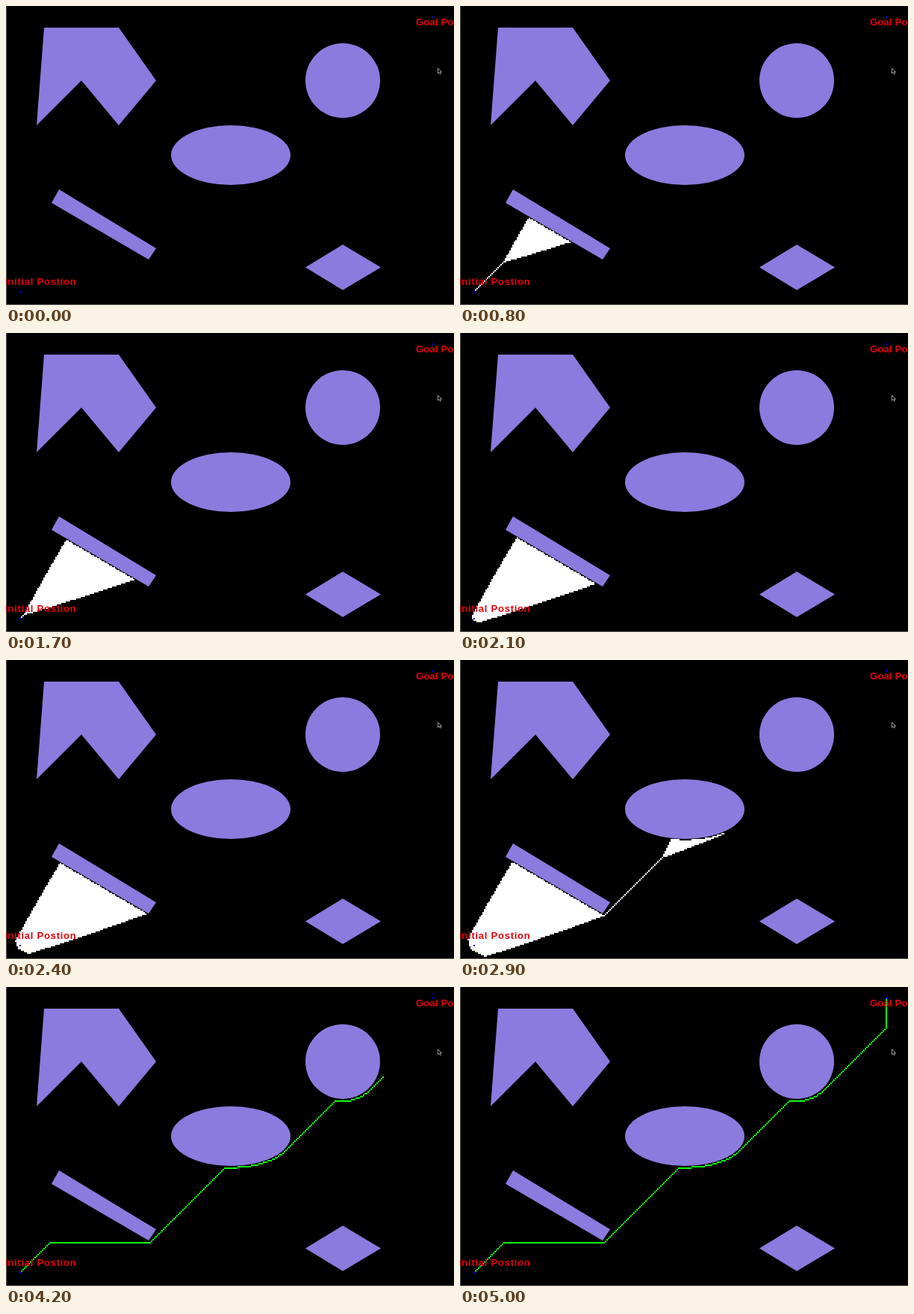
Write an HTML page with a canvas that moves like this. It is 600 px wide and 401 px high and loops after 5100 ms.

```html
<!DOCTYPE html>
<html lang="en">
<head>
<meta charset="utf-8">
<title>Path search</title>
<style>
html, body { margin: 0; width: 100%; height: 100%; overflow: hidden; background: #000; }
canvas { display: block; }
</style>
</head>
<body>
<canvas id="stage" width="600" height="401"></canvas>
<script>
const ctx = document.getElementById('stage').getContext('2d');
const LOOP = 5100, TICK = 100, SEARCH_START = 400, PATH_START = 3200;
const COLS = 300, ROWS = 200, CELL = 2;
const START = { x: 9, y: 191 }, GOAL = { x: 285, y: 7 };

const BAR = [[61, 264], [71, 246], [201, 325], [191, 340]];
const ARROW = [[51, 29], [151, 29], [201, 100], [151, 160], [101, 100], [41, 160]];
const DIAMOND = [[451, 320], [502, 350.5], [451, 381], [401, 350.5]];

// Obstacles on the search route, with a slight margin
function blocked(cx, cy) {
  const x = cx * CELL, y = cy * CELL;
  if (((x - 301) / 80) ** 2 + ((y - 200) / 40) ** 2 < 1.008) return true;
  if ((x - 451) ** 2 + (y - 100) ** 2 < 2585) return true;
  return BAR.every(([ax, ay], i) => {
    const [bx, by] = BAR[(i + 1) % BAR.length];
    const dx = bx - ax, dy = by - ay;
    return ((x - ax) * dy - (y - ay) * dx) / Math.hypot(dx, dy) <= 1;
  });
}

// A* on an 8-connected grid: every move costs 1, straight-line heuristic
function search() {
  const nodes = new Map(), open = [], visited = [];
  const addNode = (x, y, g, parent) => {
    const node = { x, y, g, parent, h: Math.hypot(GOAL.x - x, GOAL.y - y), closed: false };
    nodes.set(y * COLS + x, node);
    open.push(node);
  };
  addNode(START.x, START.y, 0, null);
  while (open.length) {
    let best = 0;
    for (let i = 1; i < open.length; i++) {
      if (open[i].g + open[i].h < open[best].g + open[best].h) best = i;
    }
    const cur = open[best];
    open[best] = open[open.length - 1];
    open.pop();
    cur.closed = true;
    visited.push(cur);
    if (cur.x === GOAL.x && cur.y === GOAL.y) break;
    for (let dy = -1; dy <= 1; dy++) for (let dx = -1; dx <= 1; dx++) {
      const x = cur.x + dx, y = cur.y + dy, g = cur.g + 1;
      if (x < 0 || y < 0 || x >= COLS || y >= ROWS || blocked(x, y)) continue;
      const node = nodes.get(y * COLS + x);
      if (!node) addNode(x, y, g, cur);
      else if (!node.closed && g <= node.g) { node.g = g; node.parent = cur; }
    }
  }
  const path = [];
  for (let n = visited[visited.length - 1]; n; n = n.parent) path.unshift(n);
  return { visited, path };
}

const { visited, path } = search();

// Number of visited cells once the front has reached pixel column x
const reach = x => visited.findIndex(n => n.x * CELL >= x) + 1;
const searchKeys = [[300, 0], [800, reach(145)], [1700, reach(169)],
  [2400, reach(185)], [2700, reach(285)], [3100, reach(520)]];
const pathKeys = [[3100, 0], [3200, 12], [3900, 188], [4200, 244], [4500, path.length]];

function lerpKeys(keys, t) {
  for (let i = 1; i < keys.length; i++) {
    const [t0, a] = keys[i - 1], [t1, b] = keys[i];
    if (t <= t1) return Math.round(a + (b - a) * (t - t0) / (t1 - t0));
  }
  return keys[keys.length - 1][1];
}

function polygon(points, fill) {
  ctx.beginPath();
  points.forEach(p => ctx.lineTo(p[0], p[1]));
  ctx.closePath();
  ctx.fillStyle = fill;
  ctx.fill();
}

function ellipse(x, y, rx, ry) {
  ctx.beginPath();
  ctx.ellipse(x, y, rx, ry, 0, 0, Math.PI * 2);
  ctx.fill();
}

function cells(list, count, color) {
  ctx.fillStyle = color;
  for (let i = 0; i < Math.min(count, list.length); i++) {
    ctx.fillRect(list[i].x * CELL, list[i].y * CELL, CELL, CELL);
  }
}

function label(text, x, y, spacing) {
  ctx.font = 'bold 13px "Liberation Sans", Arial, sans-serif';
  ctx.letterSpacing = spacing + 'px';
  ctx.fillStyle = '#e6000c';
  ctx.fillText(text, x, y);
}

function cursor() {
  ctx.beginPath();
  [[578.5, 83.5], [578.5, 90.5], [580, 89], [581.5, 91.5], [582.5, 91], [581.5, 88.5], [583.5, 88.5]]
    .forEach(p => ctx.lineTo(p[0], p[1]));
  ctx.closePath();
  ctx.fillStyle = '#000';
  ctx.fill();
  ctx.strokeStyle = '#bbb';
  ctx.lineWidth = 0.8;
  ctx.stroke();
}

function draw(time) {
  const t = Math.floor(time / TICK) * TICK;
  const shape = '#8b7bde';
  ctx.fillStyle = '#000';
  ctx.fillRect(0, 0, 600, 401);
  ctx.fillStyle = '#555';
  ctx.fillRect(0, 0, 1, 401);
  ctx.fillRect(0, 400, 600, 1);

  [ARROW, BAR, DIAMOND].forEach(p => polygon(p, shape));
  ellipse(301, 200, 80, 40);
  ellipse(451, 100, 50, 50);

  if (t >= PATH_START) cells(path, lerpKeys(pathKeys, t), '#1f1');
  else if (t >= SEARCH_START) cells(visited, lerpKeys(searchKeys, t), '#fff');

  cells([START, GOAL], 2, '#00f');
  label('Initial Postion', -2, 374, 0.75);
  label('Goal Postion', 549, 26, 0.2);
  cursor();
}

const begin = performance.now();
function loop() {
  draw((performance.now() - begin) % LOOP);
  requestAnimationFrame(loop);
}
loop();
</script>
</body>
</html>
```
